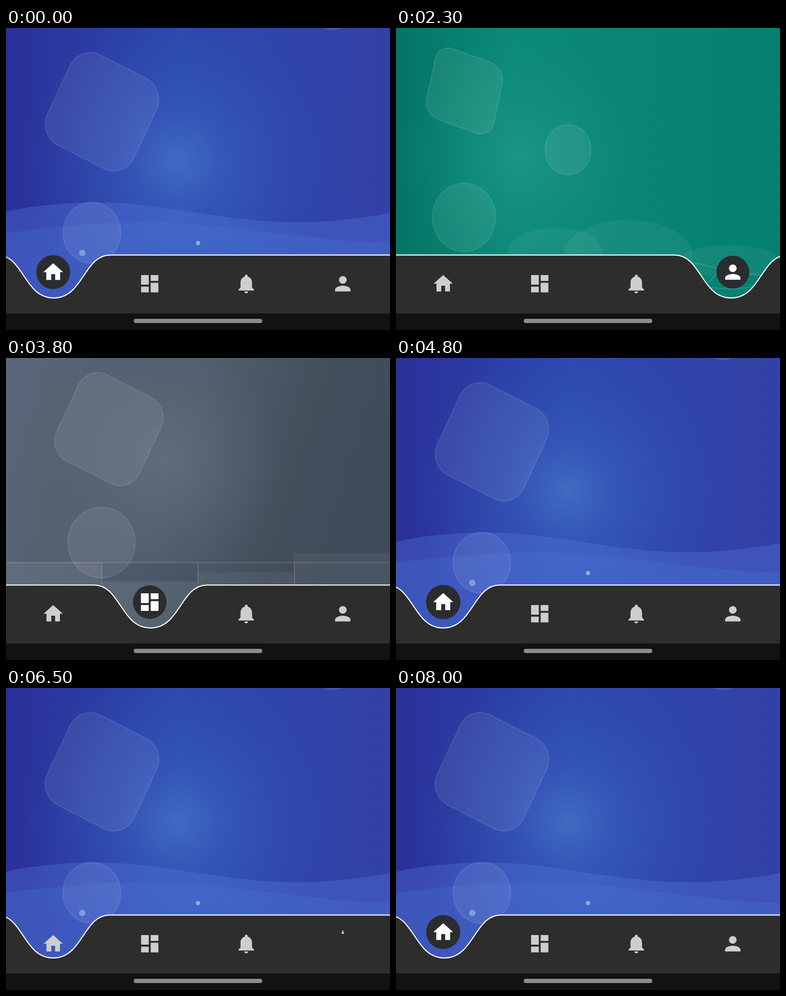
An HTML page for the animation above (8.1 s loop, 720 by 566 pixels).

```html
<!DOCTYPE html>
<html lang="en">
<head>
<meta charset="utf-8">
<title>Notched tab bar</title>
<style>
html, body { margin: 0; width: 100%; height: 100%; overflow: hidden; background: #121214; }
svg { display: block; width: 720px; height: 566px; }
.glass { fill: #fff; fill-opacity: .075; stroke: #fff; stroke-opacity: .09; stroke-width: 2.5; }
.faint { fill: #fff; fill-opacity: .05; }
.line { fill: none; stroke: #fff; stroke-opacity: .13; stroke-width: 2; }
.page { display: none; }
</style>
</head>
<body>
<svg viewBox="0 0 720 566">
  <defs>
    <linearGradient id="blue">
      <stop stop-color="#2a3098"/><stop offset=".45" stop-color="#2c48ae"/><stop offset="1" stop-color="#3341a6"/>
    </linearGradient>
    <linearGradient id="gray" x2="1" y2=".25">
      <stop stop-color="#5a6579"/><stop offset=".5" stop-color="#515e6d"/><stop offset=".8" stop-color="#434f5b"/><stop offset="1" stop-color="#3f4b5a"/>
    </linearGradient>
    <linearGradient id="red" x2="1" y2=".3">
      <stop stop-color="#b2202b"/><stop offset=".5" stop-color="#9a1a30"/><stop offset=".85" stop-color="#7f0f33"/><stop offset="1" stop-color="#7a0e33"/>
    </linearGradient>
    <linearGradient id="green">
      <stop stop-color="#037465"/><stop offset=".3" stop-color="#0c8a79"/><stop offset="1" stop-color="#048070"/>
    </linearGradient>
    <radialGradient id="blueGlow" gradientUnits="userSpaceOnUse" cx="322" cy="250" r="290">
      <stop stop-color="#4472c6" stop-opacity=".85"/><stop offset=".35" stop-color="#3a62c0" stop-opacity=".5"/><stop offset="1" stop-color="#3058b8" stop-opacity="0"/>
    </radialGradient>
    <radialGradient id="grayGlow" gradientUnits="userSpaceOnUse" cx="300" cy="190" r="220">
      <stop stop-color="#64717f" stop-opacity=".75"/><stop offset="1" stop-color="#5c6977" stop-opacity="0"/>
    </radialGradient>
    <radialGradient id="redGlow" gradientUnits="userSpaceOnUse" cx="295" cy="250" r="180">
      <stop stop-color="#b23a4a" stop-opacity=".65"/><stop offset="1" stop-color="#b02a3c" stop-opacity="0"/>
    </radialGradient>
    <radialGradient id="greenGlow" gradientUnits="userSpaceOnUse" cx="235" cy="240" r="230">
      <stop stop-color="#229a89" stop-opacity=".7"/><stop offset="1" stop-color="#14907f" stop-opacity="0"/>
    </radialGradient>
    <rect id="tile" x="-92" y="-92" width="184" height="184" rx="43" transform="scale(.98 1.022) rotate(26)"/>
  </defs>

  <g class="page">
    <path fill="url(#blue)" d="M0 0H720V566H0z"/>
    <path fill="url(#blueGlow)" d="M0 0H720V566H0z"/>
    <path fill="#5a7ae0" fill-opacity=".33" d="M0 344C60 331 120 327 175 327C300 327 400 364 550 364C620 364 680 354 720 347V566H0z"/>
    <path fill="#4a78d4" fill-opacity=".26" d="M0 384Q150 364 260 364C400 364 560 398 720 403V566H0z"/>
    <use href="#tile" class="glass" transform="translate(180 157)"/>
    <ellipse class="glass" cx="161" cy="384" rx="54" ry="57"/>
    <circle class="glass" cx="613" cy="-38.5" r="41"/>
    <circle cx="143" cy="421.5" r="6" fill="#8fb0e0" fill-opacity=".75"/>
    <circle cx="360" cy="403" r="4" fill="#8fb8d8" fill-opacity=".9"/>
  </g>

  <g class="page">
    <path fill="url(#gray)" d="M0 0H720V566H0z"/>
    <path fill="url(#grayGlow)" d="M0 0H720V566H0z"/>
    <path class="faint" d="M0 383H180V566H0zM360 402H540V566H360zM540 366H720V566H540zM180 419H360V566H180z"/>
    <path fill="#34465a" fill-opacity=".2" d="M180 384H360V419H180z"/>
    <path class="line" d="M0 383.5H720M180 384V425M360 384V425M541 384V425"/>
    <use href="#tile" class="glass" transform="translate(193 133.5) scale(.957)"/>
    <ellipse class="glass" cx="179" cy="346" rx="63" ry="66"/>
  </g>

  <g class="page">
    <path fill="url(#red)" d="M0 0H720V566H0z"/>
    <path fill="url(#redGlow)" d="M0 0H720V566H0z"/>
    <path fill="#d22a48" fill-opacity=".42" d="M0 440H90L180 348L270 440L361 346L450 440L541 348L632 440L720 387V566H0z"/>
    <use href="#tile" class="glass" transform="translate(174.5 152.5) scale(.94)"/>
    <ellipse class="glass" cx="160.5" cy="382" rx="58" ry="59.5"/>
    <circle class="glass" cx="613" cy="-32" r="42"/>
    <g fill="#f0b4be" fill-opacity=".85">
      <circle cx="179" cy="402.5" r="7.5"/><circle cx="360" cy="402.5" r="5.5"/><circle cx="541" cy="402.5" r="6.5"/>
    </g>
    <g fill="none" stroke="#f0a0ac" stroke-opacity=".4" stroke-width="1.2">
      <circle cx="179" cy="402.5" r="15"/><circle cx="360" cy="402.5" r="11.5"/><circle cx="541" cy="402.5" r="13"/>
    </g>
  </g>

  <g class="page">
    <path fill="url(#green)" d="M0 0H720V566H0z"/>
    <path fill="url(#greenGlow)" d="M0 0H720V566H0z"/>
    <ellipse class="faint" cx="299" cy="420" rx="88" ry="46"/>
    <ellipse class="faint" cx="435" cy="425" rx="121" ry="65"/>
    <ellipse class="faint" cx="625" cy="437" rx="95" ry="30"/>
    <path class="line" stroke-opacity=".3" d="M552 440Q585 443 610 455M585 477L604 458M655 459L692 465M590 486Q630 492 668 485"/>
    <rect class="glass" x="-67" y="-67.5" width="134" height="135" rx="30" transform="matrix(.94 .34 -.21 .98 128.5 118)"/>
    <ellipse class="glass" cx="127.5" cy="355" rx="59" ry="64"/>
    <ellipse class="glass" cx="322.5" cy="228" rx="43" ry="47"/>
  </g>

  <path id="bar" fill="#2d2e2c"/>
  <path id="edge" fill="none" stroke="#fff" stroke-width="2"/>
  <path fill="#121214" d="M0 535H720V566H0z"/>
  <rect x="239.5" y="545" width="241" height="8" rx="4" fill="#8b8b8c"/>
  <circle id="disc" cy="457.5" fill="#2b2c2d"/>
  <path class="icon" d="M10 20v-6h4v6h5v-8h3L12 3 2 12h3v8z"/>
  <path class="icon" d="M3 13h8V3H3v10zm0 8h8v-6H3v6zm10 0h8V11h-8v10zm0-18v6h8V3h-8z"/>
  <path class="icon" d="M12 22c1.1 0 2-.9 2-2h-4c0 1.1.89 2 2 2zm6-6v-5c0-3.07-1.64-5.64-4.5-6.32V4c0-.83-.67-1.5-1.5-1.5s-1.5.67-1.5 1.5v.68C7.63 5.36 6 7.92 6 11v5l-2 2v1h16v-1l-2-2z"/>
  <path class="icon" d="M12 12c2.21 0 4-1.79 4-4s-1.79-4-4-4-4 1.79-4 4 1.79 4 4 4zm0 2c-2.67 0-8 1.34-8 4v2h16v-2c0-2.66-5.33-4-8-4z"/>
</svg>
<script>
const LOOP = 8100, STEP = 100, MOVE = 600, PAGE_DELAY = 180;
const HOME = 0, BOARD = 1, BELL = 2, USER = 3;
// [tap time, tab]
const taps = [
  [-1200, BOARD], [-480, HOME], [380, BOARD], [1020, BELL], [1853, USER], [2600, BELL],
  [3332, BOARD], [4120, HOME], [4900, BELL], [5686, HOME], [6480, USER], [7514, HOME]
];
const $ = id => document.getElementById(id);
const pages = document.querySelectorAll('.page');
const icons = document.querySelectorAll('.icon');
const tabX = i => 88.5 + 181 * i;
const easeMove = u => u < .5 ? 16 * u ** 5 : 1 - 16 * (1 - u) ** 5;
const smooth = u => u * u * (3 - 2 * u);

function placeIcon(icon, x, y, scale, color) {
  icon.setAttribute('transform', `translate(${x} ${y}) scale(${scale}) translate(-12 -12)`);
  icon.setAttribute('fill', color);
}

function draw(t) {
  let k = taps.length - 1;
  while (taps[k][0] > t) k--;
  const [start, tab] = taps[k], from = taps[k - 1][1];
  const u = Math.min(1, (t - start) / MOVE);
  const x = tabX(from) + (tabX(tab) - tabX(from)) * easeMove(u);
  const grow = .18 + .82 * smooth(Math.min(1, u * 1.15));
  const shown = t - start < PAGE_DELAY ? from : tab;

  pages.forEach((p, i) => p.style.display = i === shown ? 'inline' : 'none');
  const top = `M-40 425.5H${x - 106}C${x - 56} 425.5 ${x - 56} 506 ${x} 506S${x + 56} 425.5 ${x + 106} 425.5H760`;
  // near the stage edges the notch runs past the bar's ends
  $('edge').setAttribute('d', top);
  $('bar').setAttribute('d', top + 'V566H-40z');
  $('disc').setAttribute('cx', tabX(tab));
  $('disc').setAttribute('r', 32.3 * grow);
  icons.forEach((icon, i) => i === tab
    ? placeIcon(icon, tabX(i), 457.5, 1.88 * grow, '#fff')
    : placeIcon(icon, tabX(i), 479.3, 1.8, '#cdcfcd'));
}

function frame() {
  const t = performance.now() % LOOP;
  draw(Math.floor(t / STEP) * STEP);
  requestAnimationFrame(frame);
}
frame();
</script>
</body>
</html>
```
